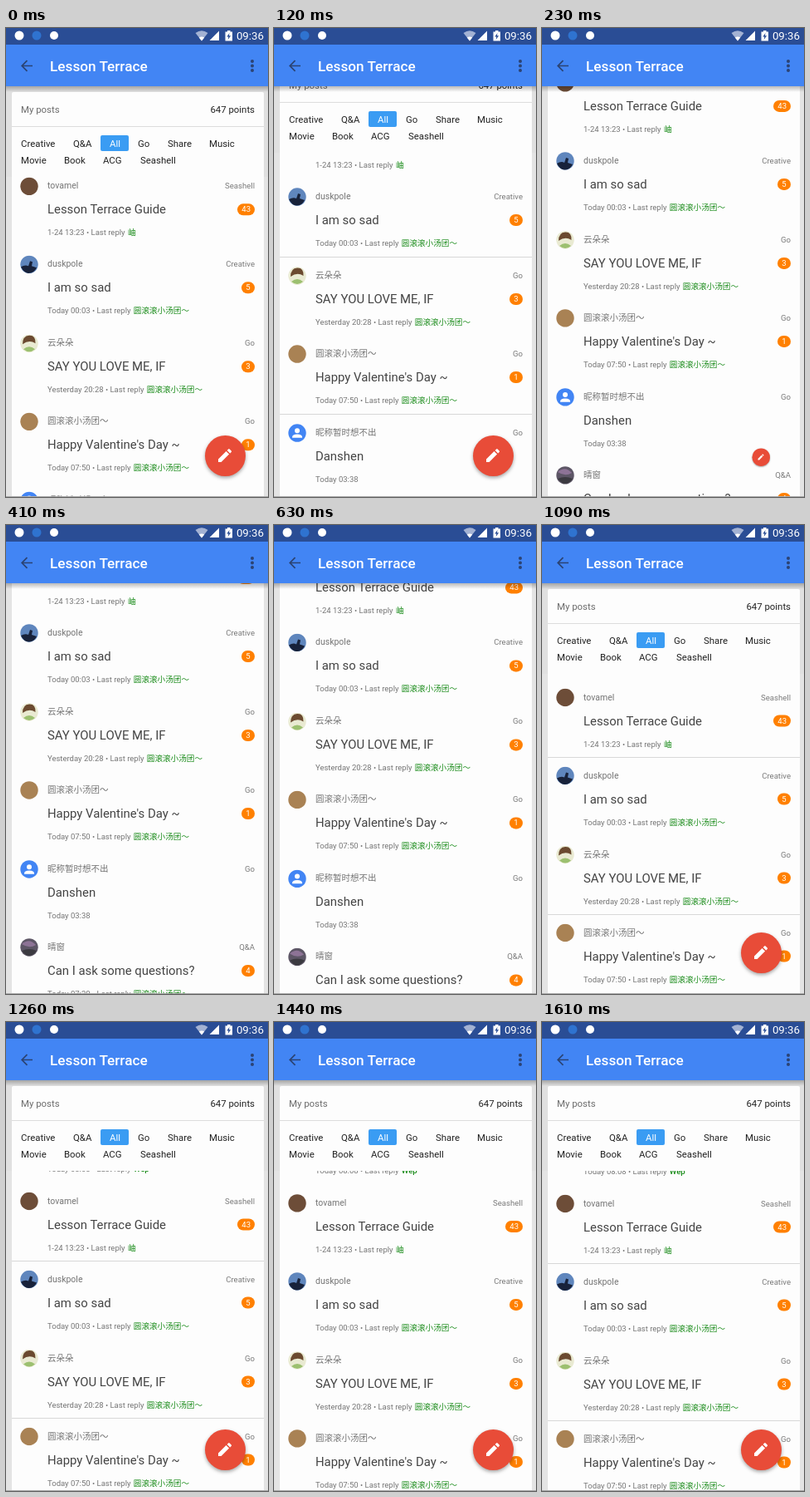
An HTML page that plays this animation: 316 by 564 pixels, repeating every 2.27 s.

```html
<!DOCTYPE html>
<html lang="zh-CN">
<head>
<meta charset="utf-8">
<title>Forum list</title>
<style>
html, body { margin: 0; width: 100%; height: 100%; overflow: hidden; }
body { font-family: Roboto, "Noto Sans CJK SC", "Noto Sans CJK", sans-serif; }
#stage { position: relative; width: 316px; height: 564px; overflow: hidden; background: #e4e4e4; }
#stage div, #stage span.at, #stage svg { position: absolute; }
.at { line-height: 14px; margin-top: -7px; white-space: pre; }
#card { left: 7px; top: 69px; width: 304px; height: 495px; background: #fdfdfd; }
#list, #lines { left: 0; top: 0; }
.row { left: 0; width: 316px; height: 0; }
.avatar { left: 17px; top: -11px; }
.name { left: 50px; font-size: 10.5px; color: #757575; }
.tag { right: 16px; font-size: 9.6px; color: #7a7a7a; }
.title { left: 50px; top: 28px; font-size: 14.9px; color: #444; }
.badge { right: 16px; top: 21px; min-width: 6px; padding: 0 5px; height: 14px; line-height: 14px;
  border-radius: 7px; background: #ff8000; color: #fff; font-size: 9.5px; text-align: center; }
.meta { left: 50px; top: 56px; font-size: 9.5px; color: #757575; }
.meta b { font-weight: 500; font-size: 9.6px; color: #178a17; margin-left: 1px; }
.line { left: 7px; width: 304px; height: 1px; background: #d8d8d8; }
#head { left: 0; top: 70px; width: 316px; height: 109px; background: #e0e0e0; }
#panel { left: 7px; top: 7px; width: 304px; height: 102px; background: #fdfdfd; border-radius: 2px 2px 0 0; }
#panel .at { font-size: 11.4px; color: #222; }
#rule { top: 41px; width: 304px; height: 1px; background: #dcdcdc; }
#pick { left: 107px; top: 52px; width: 34px; height: 19px; border-radius: 2px; background: #3a9cf3; }
#fab { left: 234px; top: 484px; width: 60px; height: 60px; transform-origin: 30px 33.5px; }
#disc { left: 5.5px; top: 5.5px; width: 49px; height: 49px; border-radius: 50%; background: #e84c38;
  box-shadow: 0 2px 4px rgba(0,0,0,.35); }
#shade { left: 0; top: 69px; width: 316px; height: 8px;
  background: linear-gradient(rgba(0,0,0,.3), rgba(0,0,0,0)); }
#bar { left: 0; top: 0; width: 316px; height: 69.5px;
  background: linear-gradient(#2a4d95 20px, #4285f4 20px); color: #fff; }
#clock { right: 5px; top: 9.5px; font-size: 13.3px; }
#name { left: 53px; top: 46px; font-size: 17.2px; font-weight: 500; }
#edge { left: 0; top: 563px; width: 316px; height: 1px; background: #a8a8a8; }
</style>
</head>
<body>
<div id="stage">
  <div id="card"></div>
  <div id="lines"></div>
  <div id="list"></div>
  <div id="fab">
    <div id="disc"></div>
    <svg width="60" height="60"><path fill="#fff" d="M22 34.5l9.5-9.5 3.6 3.6-9.5 9.5H22zM32.600 23.900l1.500-1.500q.8-.7 1.600 0l2 2q.7.8 0 1.600l-1.500 1.500z"/></svg>
  </div>
  <div id="head"><div id="panel"><div id="rule"></div><div id="pick"></div></div></div>
  <div id="shade"></div>
  <div id="bar">
    <svg width="316" height="69">
      <circle cx="16" cy="9" r="5.5" fill="#fff"/>
      <circle cx="37" cy="9" r="5.5" fill="#2f73d0"/>
      <circle cx="58" cy="9" r="5" fill="#fff"/>
      <path fill="#a3b2d3" d="M236 15.500L228.500 6q7.500-5.500 15 0z"/>
      <path fill="#fff" d="M236 15.500L232.800 11.500q3.200-2.200 6.400 0zM245.500 15h11.500V3.500z"/>
      <path fill="#fff" d="M264.500 4.500h2.500v-1.500h3.500v1.500h2.500v11h-8.500z"/>
      <path fill="#2a4d95" d="M269.500 6l-3.200 4.500h2l-.6 3.500 3.400-4.800h-2.100z"/>
      <path fill="none" stroke="#2b4373" stroke-width="1.700" d="M32 45.500H19.500M25.500 39.200l-6.300 6.300 6.300 6.300"/>
      <g fill="#2b4373"><circle cx="297" cy="40" r="2"/><circle cx="297" cy="45.500" r="2"/><circle cx="297" cy="51" r="2"/></g>
    </svg>
    <span class="at" id="clock">09:36</span>
    <span class="at" id="name">Lesson Terrace</span>
  </div>
  <div id="edge"></div>
</div>
<script>
const $ = id => document.getElementById(id);
const LOOP = 2270, STEP = 57.5, LAST = 28, PITCH = 94.5, FIRST = -1;

const disc = fill => `<circle cx="11" cy="11" r="10.7" fill="${fill}"/>`;
const art = {
  brown: disc('#6d4d38'),
  sky: disc('#5f86bd') + '<path fill="#18223a" d="M1 14q5-3 9-1l2-6 3 1-1 5 6 2q-3 6-9 6.500T1 14"/>',
  child: disc('#e9ead2') + '<path fill="#6b4a30" d="M3 12Q3 2 11 1.500T18.500 11Q11 6 3 12"/><path fill="#9cc070" d="M4 18q7-6 14 0-7 6-14 0"/>',
  tan: disc('#a98254'),
  user: disc('#4285f4') + '<circle cx="11" cy="8.200" r="3" fill="#fff"/><path fill="#fff" d="M5 16q0-3.500 6-3.500t6 3.500v.8H5z"/>',
  photo: disc('#5d5666') + '<path fill="#8d7396" d="M2 7q9-8 17 1-8 5-17-1"/><path fill="#3b3a40" d="M2 15q9-4 18 0-9 12-18 0"/>'
};

// avatar, author, tag, title, replies, time, last reply by
const pal = '圆滚滚小汤团～';
const posts = [
  ['tan', pal, 'Go', ' Can you describe your lover?', 1, 'Today 08:08', 'Wep'],
  ['brown', 'tovamel', 'Seashell', 'Lesson Terrace Guide', 43, '1-24 13:23', '岫'],
  ['sky', 'duskpole', 'Creative', 'I am so sad', 5, 'Today 00:03', pal],
  ['child', '云朵朵', 'Go', 'SAY YOU LOVE ME, IF', 3, 'Yesterday 20:28', pal],
  ['tan', pal, 'Go', "Happy Valentine's Day ~", 1, 'Today 07:50', pal],
  ['user', '昵称暂时想不出', 'Go', 'Danshen', 0, 'Today 03:38', ''],
  ['photo', '晴窗', 'Q&amp;A', 'Can I ask some questions?', 4, 'Today 07:20', pal]
];

const span = (cls, text) => `<span class="at ${cls}">${text}</span>`;
$('list').innerHTML = posts.map(([pic, who, tag, title, count, time, by], i) =>
  `<div class="row" style="top:${(i + FIRST) * PITCH + 0.5}px">` +
  `<svg class="avatar" width="22" height="22">${art[pic]}</svg>` +
  span('name', who) + span('tag', tag) + span('title', title) +
  (count ? `<div class="badge">${count}</div>` : '') +
  span('meta', time + (by ? ` • Last reply <b>${by}</b>` : '')) + '</div>').join('');
$('lines').innerHTML = posts.map(() => '<div class="line"></div>').join('');
const lines = [...$('lines').children];

const label = (text, x, y, style = '') =>
  $('panel').insertAdjacentHTML('beforeend',
    `<span class="at" style="left:${x - 7}px;top:${y - 77}px;${style}">${text}</span>`);
label('My posts', 18, 98, 'color:#6c6c6c');
label('647 points', 0, 98, 'left:auto;right:11px');
[['Creative', 18], ['Q&amp;A', 81], ['All', 125, 'color:#fff'], ['Go', 159], ['Share', 195], ['Music', 245]]
  .forEach(([text, x, style]) => label(text, x, 139, style));
[['Movie', 18], ['Book', 70], ['ACG', 117], ['Seashell', 162]].forEach(([text, x]) => label(text, x, 159));

const ramp = (k, a, b) => Math.min(1, Math.max(0, (k - a) / (b - a)));
const smooth = x => x * x * (3 - 2 * x);

// distance left in the downward fling, [step, px]
const fling = [[11, 171.3], [15, 37.7], [19, 11.2], [22, 3.2], [28, 0.2]];
function scrollAt(k) {
  if (k < 9) return 16 + 173.35 * 0.2821 ** (k / 4);
  if (k < 11) return 26 + 20.4 * ((k - 9) / 2) ** 2;
  const i = Math.max(1, fling.findIndex(p => k <= p[0]));
  const [a, from] = fling[i - 1], [b, to] = fling[i];
  return 217.7 - from * (to / from) ** ((k - a) / (b - a));
}

function draw(k) {
  const y = scrollAt(k), leaving = k < 13;
  $('list').style.transform = `translateY(${y}px)`;
  // hairlines show only when they fall on a pixel row
  lines.forEach((line, i) => {
    const at = y + (i + FIRST) * PITCH - 22 + 0.05;
    line.style.display = at - Math.floor(at) < 0.3 ? 'block' : 'none';
    line.style.top = Math.floor(at) + 'px';
  });
  const away = leaving ? smooth(ramp(k, 1, 4)) : 1 - smooth(ramp(k, 15, 18));
  $('head').style.transform = `translateY(${-112 * away}px)`;
  const size = leaving ? 1 - ramp(k, 2, 5.57) : smooth(ramp(k, 15.5, 18.5));
  $('fab').style.transform = `scale(${size})`;
}

const start = performance.now();
function tick() {
  const t = (performance.now() - start) % LOOP;
  draw(Math.min(LAST, Math.floor((t + 7.5) / STEP)));
  requestAnimationFrame(tick);
}
tick();
</script>
</body>
</html>
```
